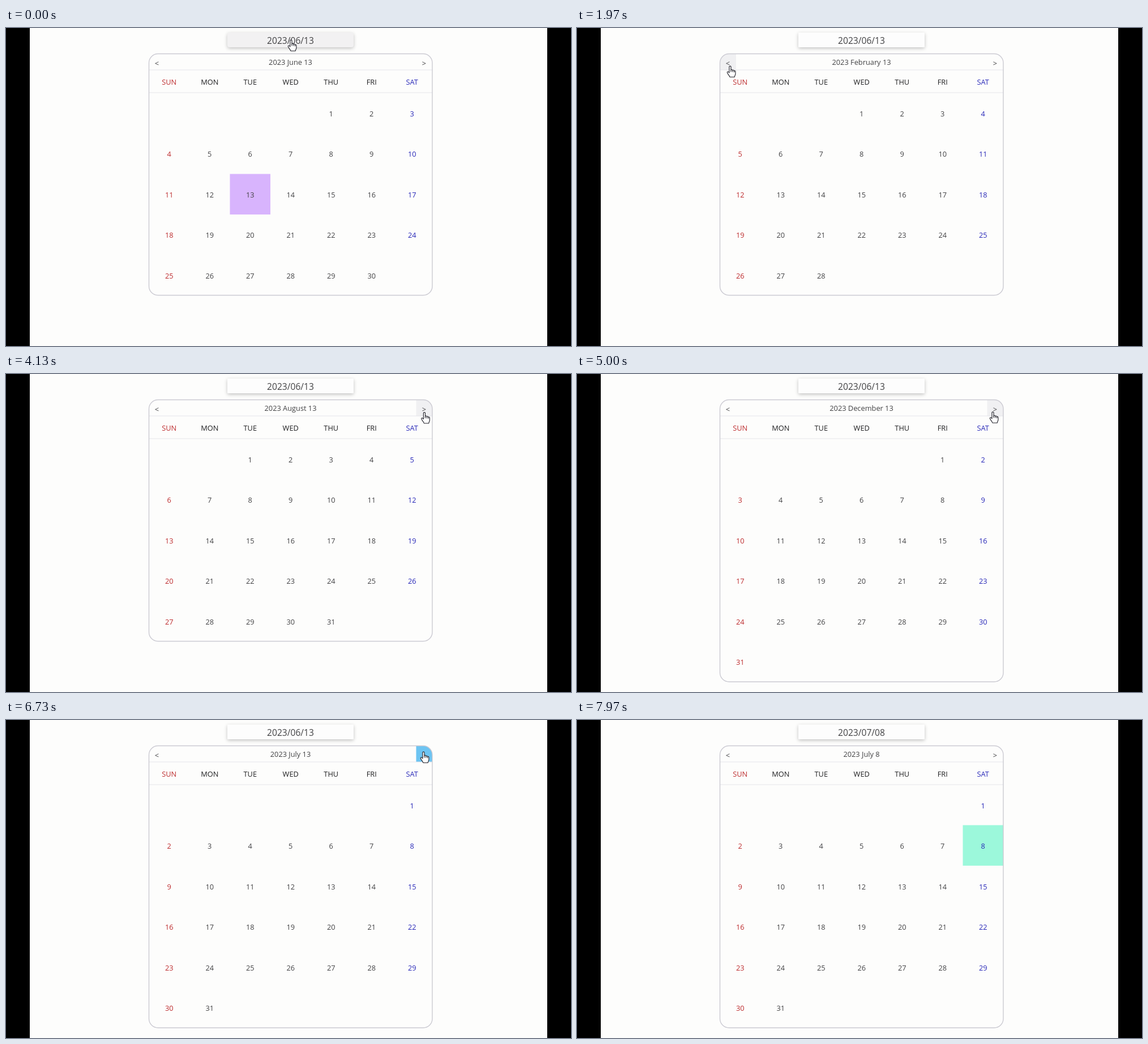
Write an HTML page with a canvas that moves like this. It is 998 px wide and 561 px high and loops after 8000 ms.

```html
<!DOCTYPE html>
<html lang="en">
<head>
<meta charset="utf-8">
<title>Date picker</title>
<style>
  html, body { margin: 0; width: 100%; height: 100%; overflow: hidden; background: #000; }
  canvas { display: block; }
</style>
</head>
<body>
<canvas id="stage" width="998" height="561"></canvas>
<script>
const ctx = document.getElementById('stage').getContext('2d');
const LOOP = 8000;
const PAGE = { x: 42, w: 914 };
const FIELD = { x: 391, y: 8, w: 223, h: 26 };
const CAL = { x: 252.5, y: 45.5, w: 500.5, head: 74, top: 114, row: 71.5 };
const COL = CAL.w / 7;
const CLOSED = -1;
const FONT = '"Open Sans", "Noto Sans", sans-serif';
const MONTHS = ['January', 'February', 'March', 'April', 'May', 'June', 'July',
  'August', 'September', 'October', 'November', 'December'];
const WEEKDAYS = ['SUN', 'MON', 'TUE', 'WED', 'THU', 'FRI', 'SAT'];
const INK = '#424244', RED = '#bd2c2e', BLUE = '#2828b8';

// Each click on an arrow: time of release and the month it brings up.
const prevClicks = [4, 3, 2, 1, 0].map((month, i) => [850 + i * 320, month]);
const nextClicks = [
  ...[1, 2, 3, 4, 5, 6, 7].map((month, i) => [3222 + i * 138, month]),
  ...[8, 9, 10, 11].map((month, i) => [4330 + i * 180, month]),
  [6725, 6]
];
const views = [[0, 5], ...prevClicks, ...nextClicks, [5780, CLOSED], [6260, 5]]
  .sort((a, b) => a[0] - b[0]);
const PICK_TIME = 7560;

// Fingertip path: time, x, y
const path = [
  [0, 503.5, 21], [120, 503.5, 21], [650, 270.5, 67], [2350, 270.5, 67],
  [2950, 739, 67.5], [4950, 739, 67.5], [5600, 484.5, 25], [6250, 484.5, 25],
  [6600, 737.5, 56], [6900, 737.5, 56], [7350, 716, 224], [7600, 716, 224],
  [7900, 970, 330], [LOOP, 970, 330]
];

const clamp = v => Math.max(0, Math.min(1, v));
const ease = v => v * v * (3 - 2 * v);
const pad = n => String(n).padStart(2, '0');

function pointerAt(t) {
  const i = Math.max(1, path.findIndex(p => p[0] > t));
  const [t0, x0, y0] = path[i - 1], [t1, x1, y1] = path[i];
  const k = ease((t - t0) / (t1 - t0));
  return { x: x0 + (x1 - x0) * k, y: y0 + (y1 - y0) * k };
}

const inside = (p, r) => p.x >= r.x && p.x <= r.x + r.w && p.y >= r.y && p.y <= r.y + r.h;

// Strength of the pressed colour: quick rise before release, short fade after.
const pressGlow = (clicks, t) => Math.max(...clicks.map(([c]) =>
  t < c ? clamp((t - c + 70) / 70) : clamp(1 - (t - c) / 75)));

function text(str, x, baseline, color = INK, size = 12.8) {
  ctx.font = `${size}px ${FONT}`;
  ctx.fillStyle = color;
  ctx.fillText(str, x, baseline);
}

function roundRect(x, y, w, h, r) {
  ctx.beginPath();
  ctx.roundRect(x, y, w, h, r);
}

function drawField(label, hover) {
  ctx.save();
  ctx.shadowColor = 'rgba(0,0,0,.24)';
  ctx.shadowBlur = 6;
  ctx.shadowOffsetY = 2;
  ctx.fillStyle = hover ? '#f2f1f2' : '#fdfdfd';
  roundRect(FIELD.x, FIELD.y, FIELD.w, FIELD.h, hover ? 4 : 1);
  ctx.fill();
  ctx.restore();
  text(label, 502.5, 28, INK, 15.6);
}

function drawArrow(sign, x, clicks, t, pointer) {
  const box = { x, y: 46, w: 28.5, h: 28 };
  if (inside(pointer, box)) {
    const k = pressGlow(clicks, t);
    const mix = (a, b) => Math.round(a + (b - a) * k);
    ctx.fillStyle = `rgb(${mix(240, 98)},${mix(240, 192)},${mix(242, 242)})`;
    ctx.fillRect(box.x, box.y, box.w, box.h);
  }
  text(sign, x + 14, 66.5);
}

function drawCalendar(month, day, t, pointer) {
  const first = new Date(2023, month, 1).getDay();
  const count = new Date(2023, month + 1, 0).getDate();
  const height = CAL.top + CAL.row * Math.ceil((first + count) / 7) - CAL.y;
  const outline = () => roundRect(CAL.x, CAL.y, CAL.w, height, 16);
  const colour = col => col === 0 ? RED : col === 6 ? BLUE : INK;

  ctx.save();
  outline();
  ctx.clip();
  drawArrow('<', 252.5, prevClicks, t, pointer);
  drawArrow('>', 724.5, nextClicks, t, pointer);

  text(`2023 ${MONTHS[month]} ${day}`, 502.5, 65);
  ctx.fillStyle = '#e5e5ec';
  ctx.fillRect(CAL.x, CAL.head - .5, CAL.w, 1);
  ctx.fillRect(CAL.x, CAL.top - .5, CAL.w, 1);
  WEEKDAYS.forEach((name, col) =>
    text(name, CAL.x + COL * (col + .5), 99.7, col % 6 ? '#202022' : colour(col)));

  for (let d = 1; d <= count; d++) {
    const cell = first + d - 1, col = cell % 7, row = Math.floor(cell / 7);
    const x = CAL.x + col * COL, y = Math.floor(CAL.top + row * CAL.row);
    const picked = d === day && (day === 13 ? month === 5 : month === 6);
    if (picked) {
      ctx.fillStyle = day === 13 ? '#d8b4fd' : '#9cf8db';
      ctx.fillRect(x, y + .5, COL, CAL.row);
    }
    // The very first cell of the grid keeps the plain ink.
    text(d, x + COL / 2, y + 42, cell ? colour(col) : INK);
  }
  ctx.restore();

  outline();
  ctx.strokeStyle = '#cbcad2';
  ctx.lineWidth = 1.4;
  ctx.stroke();
}

const hand = new Path2D('M-1.6 1.5C-1.6-.4 1.5-.4 1.5 1.5V7.2C2.2 6 4.2 6.2 4.4 7.8' +
  'C5.2 6.8 7 7.2 7.1 8.7C8 8 9.4 8.6 9.4 10V14C9.4 16 8 17 7.7 19.5H-.6' +
  'C-1 17.3-3.2 15.6-4.7 12.7C-6.2 10.2-4 9.2-2.6 10.8L-1.6 12Z');
const knuckles = new Path2D('M1.5 7.2V10.5M4.4 7.8V10.8M7.1 8.7V11.2');

function drawPointer({ x, y }) {
  ctx.save();
  ctx.translate(x, y);
  ctx.fillStyle = '#fff';
  ctx.fill(hand);
  ctx.strokeStyle = '#26262e';
  ctx.lineWidth = 1.15;
  ctx.lineJoin = 'round';
  ctx.stroke(hand);
  ctx.stroke(knuckles);
  ctx.restore();
}

function draw(t) {
  const pointer = pointerAt(t);
  const month = views.filter(v => v[0] <= t).pop()[1];
  const picked = t >= PICK_TIME;
  const day = picked ? 8 : 13;

  ctx.fillStyle = '#000';
  ctx.fillRect(0, 0, 998, 561);
  ctx.save();
  ctx.beginPath();
  ctx.rect(PAGE.x, 0, PAGE.w, 561);
  ctx.clip();
  ctx.fillStyle = '#fdfdfc';
  ctx.fillRect(PAGE.x, 0, PAGE.w, 561);
  ctx.textAlign = 'center';

  drawField(`2023/${pad(picked ? 7 : 6)}/${pad(day)}`, inside(pointer, FIELD));
  if (month !== CLOSED) drawCalendar(month, day, t, pointer);
  drawPointer(pointer);
  ctx.restore();
}

const start = performance.now();
function frame() {
  draw((performance.now() - start) % LOOP);
  requestAnimationFrame(frame);
}
frame();
</script>
</body>
</html>
```
